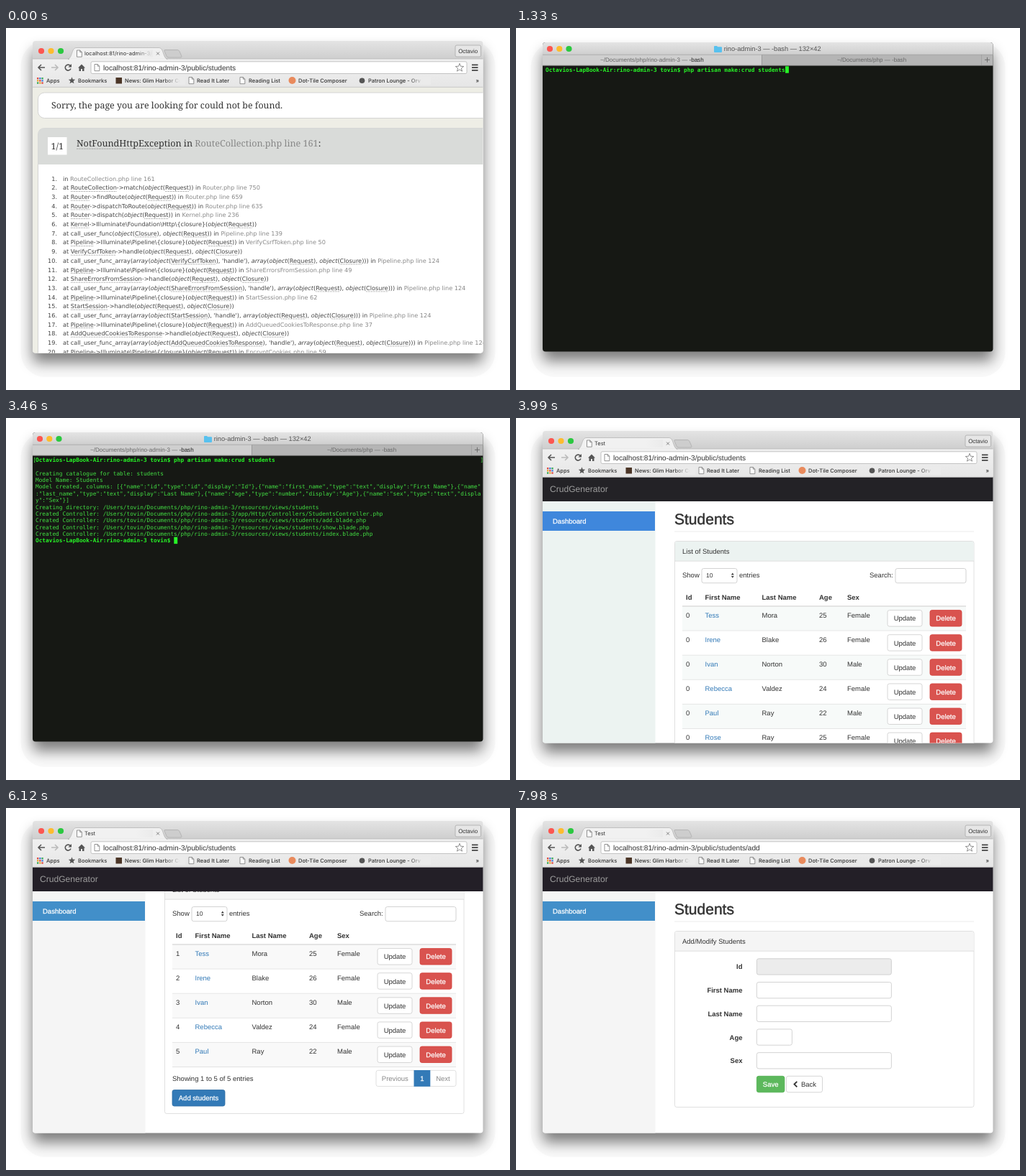
Recreate the animation shown at these times as an HTML page. Size 700 px wide and 504 px high, loop 8000 ms.

```html
<!DOCTYPE html>
<html lang="en">
<head>
<meta charset="utf-8">
<title>CRUD generator demo</title>
<style>
html, body { margin: 0; width: 100%; height: 100%; overflow: hidden; background: #fff; }
svg { display: block; width: 100vw; height: 100vh; }
text { font: 9.5px "Liberation Sans", Arial, sans-serif; fill: #333; white-space: pre; text-rendering: geometricPrecision; }
.ui { font: 500 7.5px Inter, sans-serif; }
.serif { font: 12.4px "Noto Serif", Georgia, serif; }
.list { font: 8.17px "DejaVu Sans", Verdana, sans-serif; fill: #444; }
.mono { font: 7.79px "DejaVu Sans Mono", Menlo, monospace; fill: #43de43; }
.mono.b { font-weight: 700; fill: #27f527; }
.b { font-weight: 700; }
.w { fill: #fff; stroke: #fff; stroke-width: .25; }
.link { fill: #337ab7; }
.dim { fill: #888; }
.it { font-style: italic; }
</style>
</head>
<body>
<svg id="stage" viewBox="0 0 700 504" xmlns="http://www.w3.org/2000/svg"></svg>
<script>
const esc = s => String(s).replace(/&/g, '&amp;').replace(/</g, '&lt;');
const text = (x, y, s, cls = '', more = '') =>
  `<text x="${x}" y="${y}" class="${cls}" ${more}>${esc(s)}</text>`;
const rect = (x, y, w, h, fill, more = '') =>
  `<rect x="${x}" y="${y}" width="${w}" height="${h}" fill="${fill}" ${more}/>`;
const box = (x, y, w, h, fill, stroke, r = 2.7) =>
  rect(x, y, w, h, fill, `stroke="${stroke}" stroke-width=".8" rx="${r}"`);
const path = (d, fill, more = '') => `<path d="${d}" fill="${fill}" ${more}/>`;
const line = (d, color, w = .8, more = '') =>
  path(d, 'none', `stroke="${color}" stroke-width="${w}" ${more}`);
const circle = (x, y, r, fill) => `<circle cx="${x}" cy="${y}" r="${r}" fill="${fill}"/>`;
const mid = 'text-anchor="middle"', end = 'text-anchor="end"';

const defs = `<defs>
  <filter id="blur" x="-10%" y="-10%" width="120%" height="120%"><feGaussianBlur stdDeviation="9.5"/></filter>
  <linearGradient id="strip" x2="0" y2="1"><stop stop-color="#e4e4e4"/><stop offset="1" stop-color="#cecece"/></linearGradient>
  <linearGradient id="tools" x2="0" y2="1"><stop stop-color="#f1f1f1"/><stop offset="1" stop-color="#e6e6e6"/></linearGradient>
  <linearGradient id="fade"><stop stop-color="#ebebeb" stop-opacity="0"/><stop offset="1" stop-color="#ebebeb"/></linearGradient>
  <clipPath id="win"><rect x="37" y="18" width="625.5" height="434.5" rx="4"/></clipPath>
  <clipPath id="term"><rect x="37" y="20" width="625.5" height="430.5" rx="4"/></clipPath>
  <clipPath id="body"><rect x="37" y="116" width="625.5" height="337"/></clipPath>
</defs>`;

const shadow = (y, h) =>
  rect(20.5, y, 659, 486 - y, '#000', 'rx="34" opacity=".025"') +
  rect(37, y + 13, 625.5, h, '#000', 'rx="5" opacity=".5" filter="url(#blur)"');
const lights = (xs, y) =>
  ['#fc5650', '#fdbc2e', '#2bc840'].map((c, i) => circle(xs[i], y, 4.1, c)).join('');
const doc = (x, y) =>
  path(`M${x} ${y}h4.2l2.6 2.6v6.6h-6.8zM${x + 4.2} ${y}v2.6h2.6`, '#fff', 'stroke="#777" stroke-width=".8"');

function star(cx, cy, r) {
  let d = '';
  for (let i = 0; i < 10; i++) {
    const a = i * Math.PI / 5, k = i % 2 ? r * .42 : r;
    d += (i ? 'L' : 'M') + (cx + k * Math.sin(a)).toFixed(2) + ' ' + (cy - k * Math.cos(a)).toFixed(2);
  }
  return d + 'z';
}

function toolbar(title, url) {
  const dots = ['#e0483e', '#3f7de0', '#35a853', '#e8a92c'];
  let apps = '';
  for (let i = 0; i < 9; i++)
    apps += rect(43 + i % 3 * 3.2, 69 + Math.floor(i / 3) * 3.2, 2.3, 2.3, dots[i % 4]);
  return rect(37, 18, 626, 25, 'url(#strip)') + lights([49, 62.5, 76], 32) +
    path('M221 30.5h17q2 0 3 2l3 7q0 1.5-2 1.5h-16q-2 0-3-2l-3-7q-.5-1.5 1-1.5z', '#cdcdcd', 'stroke="#a9a9a9" stroke-width=".7"') +
    rect(37, 43, 626, 39.5, 'url(#tools)') + line('M37 43H663', '#b4b4b4', .7) +
    path('M86 43.4C92 42 91 28 97 27.5H213C219 28 218 42 224 43.4z', '#f1f1f1', 'stroke="#b0b0b0" stroke-width=".7"') +
    rect(88, 43, 135, 2, '#f1f1f1') +
    doc(98.5, 31) + text(109, 38.2, title, 'ui', 'style="font-weight:400"') +
    rect(180, 30, 24, 11, 'url(#fade)') + rect(204, 30, 10, 11, '#efefef') +
    line('M209 33.5l4 4m0-4l-4 4', '#777', .9) +
    box(624, 24, 35.5, 16, '#e6e6e6', '#aaa', 2) + text(641.7, 35, 'Octavio', '', mid + ' style="font-size:8px"') +
    line('M54 55H45.5M49 51l-4 4l4 4', '#555', 1.6) +
    line('M63 55h8.5M68 51l4 4l-4 4', '#bbb', 1.6) +
    line('M89.4 52.6A4 4 0 1 0 90 56.5', '#555', 1.6) + path('M91 50v4.6h-4.6z', '#555') +
    path('M100 55.5l5-5l5 5h-1.5v4.5h-2.5v-3h-2v3h-2.5v-4.5z', '#555') +
    box(118, 46.8, 522, 16.7, '#fff', '#b5b5b5', 2) + doc(123, 50.5) +
    text(135, 58.8, url, '', 'style="font-size:10.15px"') +
    path(star(630, 55.3, 6), '#fff', 'stroke="#777" stroke-width=".8"') +
    line('M647 51.3h8.5m-8.5 3.8h8.5m-8.5 3.8h8.5', '#444', 1.8) +
    apps + text(56, 76, 'Apps', 'ui') +
    path(star(91.5, 73.3, 5), '#555') + text(100, 76, 'Bookmarks', 'ui') +
    rect(152.5, 69, 8.5, 8.5, '#4b3527') + text(165, 76, 'News: Glim Harbor Co', 'ui') +
    rect(218, 68, 24, 11, 'url(#fade)') + rect(242, 68, 7, 11, '#ebebeb') +
    doc(254, 68.5) + text(265, 76, 'Read It Later', 'ui') +
    doc(325, 68.5) + text(337, 76, 'Reading List', 'ui') +
    circle(397.5, 73, 5, '#e98a5c') + text(406, 76, 'Dot-Tile Composer', 'ui') +
    circle(494.5, 73.2, 3.8, '#555') + text(503, 76, 'Patron Lounge - Orv', 'ui') +
    rect(558, 68, 22, 11, 'url(#fade)') + rect(580, 68, 10, 11, '#ebebeb') +
    text(652.5, 76, '»', 'ui') + line('M37 82.3H663', '#bcbcbc', .7);
}

const browser = (title, url, page) => shadow(18, 434.5) +
  `<g clip-path="url(#win)">${rect(37, 18, 626, 435, '#fff')}${page}${toolbar(title, url)}</g>`;

// Stack trace: italic types, dotted class names, grey locations.
function trace(s) {
  const token = /(\b(?:object|array)(?=\())|((?<=object\()\w+|(?<=^at )\w+(?=->))|(\w+\.php line \d+)/g;
  return esc(s).replace(token, (m, it, abbr) =>
    `<tspan class="${it ? 'it' : abbr ? 'abbr' : 'dim'}">${m}</tspan>`);
}

function errorPage() {
  const req = '(object(Request))', both = '(object(Request), object(Closure))';
  const rows = [
    'in RouteCollection.php line 161',
    `at RouteCollection->match${req} in Router.php line 750`,
    `at Router->findRoute${req} in Router.php line 659`,
    `at Router->dispatchToRoute${req} in Router.php line 635`,
    `at Router->dispatch${req} in Kernel.php line 236`,
    `at Kernel->Illuminate\\Foundation\\Http\\{closure}${req}`,
    'at call_user_func(object(Closure), object(Request)) in Pipeline.php line 139'
  ];
  const layers = { VerifyCsrfToken: 50, ShareErrorsFromSession: 49, StartSession: 62,
    AddQueuedCookiesToResponse: 37, EncryptCookies: 59 };
  for (const [name, n] of Object.entries(layers))
    rows.push(`at Pipeline->Illuminate\\Pipeline\\{closure}${req} in ${name}.php line ${n}`,
      `at ${name}->handle${both}`,
      `at call_user_func_array(array(object(${name}), 'handle'), array${both}) in Pipeline.php line 124`);
  const list = rows.slice(0, 20).map((s, i) => {
    const y = (212.8 + i * 12.67).toFixed(2);
    return text(71, y, i + 1 + '.', 'list', end) + `<text x="79" y="${y}" class="list">${trace(s)}</text>`;
  }).join('');
  return rect(37, 82, 626, 371, '#eeeee6') +
    box(44.5, 90, 640, 35.5, '#fff', '#ccc', 9) +
    text(63, 112.3, 'Sorry, the page you are looking for could not be found.', 'serif') +
    path('M44.5 460V149q0-9.5 9.5-9.5H680V460z', '#fff', 'stroke="#ccc" stroke-width=".8"') +
    path('M44.5 190V149q0-9.5 9.5-9.5H680V190z', '#d9dbd9') +
    rect(58, 152, 26.5, 24.5, '#fff') + text(71.2, 169, '1/1', 'serif', mid) +
    `<text x="98" y="165" class="serif" style="font-size:12.6px"><tspan class="abbr">NotFoundHttpException</tspan> in <tspan class="dim">RouteCollection.php line 161</tspan>:</text>` + list;
}

// Dotted rule below each class name, placed from the laid-out text.
function underline(span) {
  const p = span.getStartPositionOfChar(0), size = parseFloat(getComputedStyle(span).fontSize);
  const y = (p.y + size * .25).toFixed(2);
  span.parentNode.insertAdjacentHTML('beforebegin',
    line(`M${p.x} ${y}h${span.getComputedTextLength()}`, '#666', .7, 'stroke-dasharray=".7 .7"'));
}

const HOST = 'Octavios-LapBook-Air:rino-admin-3 tovin$ ';
const CMD = HOST + 'php artisan make:crud students';
const COL = 4.69, ROW = 9.37;

function terminal(rows, cursorRow, cursorCol) {
  const out = rows.map((s, i) =>
    s && text(41, (61 + i * ROW).toFixed(2), s, s.startsWith(HOST) ? 'mono b' : 'mono')).join('');
  const marks = rows.length > 1 ? text(37.3, 61, '[', 'mono') + text(658.6, 61, ']', 'mono') : '';
  const label = 'style="font-size:8.07px;fill:#666"';
  return shadow(20, 430.5) + `<g clip-path="url(#term)">` +
    rect(37, 20, 626, 431, '#161814') + rect(37, 20, 626, 17.5, 'url(#strip)') +
    rect(37, 37, 304.5, 15.3, '#cfcfcf') + rect(341.5, 37, 322, 15.3, '#b5b5b5') +
    line('M37 37.2H663M341.5 37V52M646.5 37V52M37 52H663', '#9d9d9d', .7) +
    lights([47, 60.3, 73.5], 29) +
    path('M275 26q0-1 1-1h3l1.2 1.3h4.8q1 0 1 1v5.7q0 1-1 1h-9q-1 0-1-1z', '#58c1ee') +
    text(288.7, 32.3, 'rino-admin-3 — -bash — 132×42', '', 'style="font-size:9.25px;fill:#555"') +
    `<text x="117" y="47.3" ${label}>~/Documents/php/rino-admin-3 — <tspan style="fill:#222">-bash</tspan></text>` +
    text(446, 47.3, '~/Documents/php — -bash', '', label) +
    line('M651 44.3h7m-3.5-3.5v7', '#666', .9) + out + marks +
    rect(41 + cursorCol * COL, 53.3 + cursorRow * ROW, 4.9, 9.4, '#27f527') + '</g>';
}

function outputRows() {
  const cols = [['id', 'id', 'Id'], ['first_name', 'text', 'First Name'], ['last_name', 'text', 'Last Name'],
    ['age', 'number', 'Age'], ['sex', 'text', 'Sex']];
  const json = JSON.stringify(cols.map(([name, type, display]) => ({ name, type, display })));
  const root = '/Users/tovin/Documents/php/rino-admin-3/', views = root + 'resources/views/students';
  return [CMD, '', 'Creating catalogue for table: students', 'Model Name: Students',
    ...('Model created, columns: ' + json).match(/.{1,132}/g),
    'Creating directory: ' + views,
    `Created Controller: ${root}app/Http/Controllers/StudentsController.php`,
    ...['add', 'show', 'index'].map(v => `Created Controller: ${views}/${v}.blade.php`), HOST];
}

const button = (x, y, w, s, fill = '#fff', stroke = '#ccc') =>
  box(x, y, w, 22.5, fill, stroke) + text(x + w / 2, y + 14.8, s, fill === '#fff' ? '' : 'w', mid);

const heading = text(220, 148, 'Students', '', 'style="font-size:21px" stroke="#333" stroke-width=".5"') +
  line('M220 158H636', '#e8e8e8');
const panel = (h, tint, title) => box(220.5, 171.5, 415.5, h, '#fff', '#d8d8d8') +
  path('M221 199V174.2q0-2.3 2.3-2.3H633.2q2.3 0 2.3 2.3V199z', tint) + line('M220.5 199.2H636', '#d8d8d8') +
  text(231, 189, title);

function app(content, tint = '#f5f5f5', active = '#428fc9', nav = '#231f27', scroll = 0) {
  return `<g clip-path="url(#body)"><g transform="translate(0 ${-scroll})">${heading}${content}</g></g>` +
    rect(37, 116, 156.5, 337, tint) + rect(37, 130, 156, 27, active) + text(51, 147, 'Dashboard', 'w') +
    rect(37, 82, 626, 34, nav) + text(47, 103.3, 'CrudGenerator', '', 'style="font-size:12.1px;fill:#9d9d9d"');
}

const people = [['Tess', 'Mora', 25, 'Female'], ['Irene', 'Blake', 26, 'Female'], ['Ivan', 'Norton', 30, 'Male'],
  ['Rebecca', 'Valdez', 24, 'Female'], ['Paul', 'Ray', 22, 'Male'], ['Rose', 'Ray', 25, 'Female']];
const colX = [236, 262.5, 341.5, 421, 460];

function table(count, tint, stripe, id) {
  let s = panel(count > 5 ? 350 : 326, tint, 'List of Students') +
    text(231, 222.4, 'Show') + box(258, 209.5, 49, 20.2, '#fff', '#c8c8c8') +
    text(264, 222.4, '10', '', 'style="font-size:8.5px"') +
    path('M298.8 218.4l2-2.8l2 2.8zM298.8 220l2 2.8l2-2.8z', '#444') + text(310, 222.4, 'entries') +
    text(491, 222.4, 'Search:') + box(527, 209.5, 98, 20.2, '#fff', '#c8c8c8') +
    ['Id', 'First Name', 'Last Name', 'Age', 'Sex'].map((h, i) => text(colX[i], 252.5, h, 'b')).join('');
  people.slice(0, count).forEach((p, i) => {
    const y = 262 + i * 34.1;
    if (i % 2 === 0) s += rect(231, y, 394, 34.1, stripe);
    s += line(`M231 ${y}H625`, '#ddd', i ? .7 : 1.3) +
      [id(i), ...p].map((v, c) => text(colX[c], y + 15.6, v, c === 1 ? 'link' : '')).join('') +
      button(516, y + 5.6, 48, 'Update') + button(575, y + 5.6, 44, 'Delete', '#d9534f', '#d43f3a');
  });
  if (count > 5) return s;
  return s + line('M231 432.5H625', '#ddd') + text(231, 451.6, 'Showing 1 to 5 of 5 entries') +
    box(514, 437.3, 111, 22.2, '#fff', '#d8d8d8') + rect(566.5, 437, 22.8, 22.8, '#337ab7') +
    text(540.3, 452, 'Previous', 'dim', mid) + text(578, 452, '1', 'w', mid) + text(607, 452, 'Next', 'dim', mid) +
    button(231, 464.5, 73, 'Add students', '#337ab7', '#2e6da4');
}

function form(values) {
  const fields = ['Id', 'First Name', 'Last Name', 'Age', 'Sex'].map((name, i) => {
    const y = 209.8 + i * 32.7;
    return text(314.5, y + 14.6, name, 'b', end) +
      box(334.4, y, i === 3 ? 49 : 187, 22.3, i ? '#fff' : '#ececec', '#c8c8c8') +
      text(343, y + 14.6, values[i] || '', '', 'style="fill:#555"');
  }).join('');
  return panel(245, '#f5f5f5', 'Add/Modify Students') + fields +
    button(334.4, 373.3, 38.5, 'Save', '#5cb85c', '#4cae4c') + box(375.5, 373.3, 50, 22.5, '#fff', '#ccc') +
    line('M390.3 380.8l-3.8 3.8l3.8 3.8', '#333', 1.9) + text(396, 388.1, 'Back');
}

const base = 'localhost:81/rino-admin-3/public/students';
const rows = outputRows();
const scenes = [
  browser('localhost:81/rino-admin-3/p', base, errorPage()),
  terminal([CMD], 0, CMD.length),
  terminal(rows, rows.length - 1, HOST.length),
  browser('Test', base, app(table(6, '#ecf3f1', '#f7faf9', () => 0), '#ecf3f1', '#3f87dc', '#232226')),
  browser('Test', base, app(table(5, '#f5f5f5', '#f9f9f9', i => i + 1), '#f5f5f5', '#428fc9', '#231f27', 72)),
  browser('Test', base + '/update/5', app(form([5, ...people[4]]))),
  browser('Test', base + '/add', app(form([])))
];

const stage = document.getElementById('stage');
stage.innerHTML = defs + scenes.map(s => `<g>${s}</g>`).join('');
stage.querySelectorAll('.abbr').forEach(underline);
const groups = [...stage.children].slice(1);
const STEP = 1330, LOOP = 8000;

function render(ms) {
  const now = Math.min(groups.length - 1, Math.floor(ms % LOOP / STEP));
  groups.forEach((g, i) => g.setAttribute('display', i === now ? 'inline' : 'none'));
}

const start = performance.now();
function tick() {
  render(performance.now() - start);
  requestAnimationFrame(tick);
}
tick();
</script>
</body>
</html>
```
